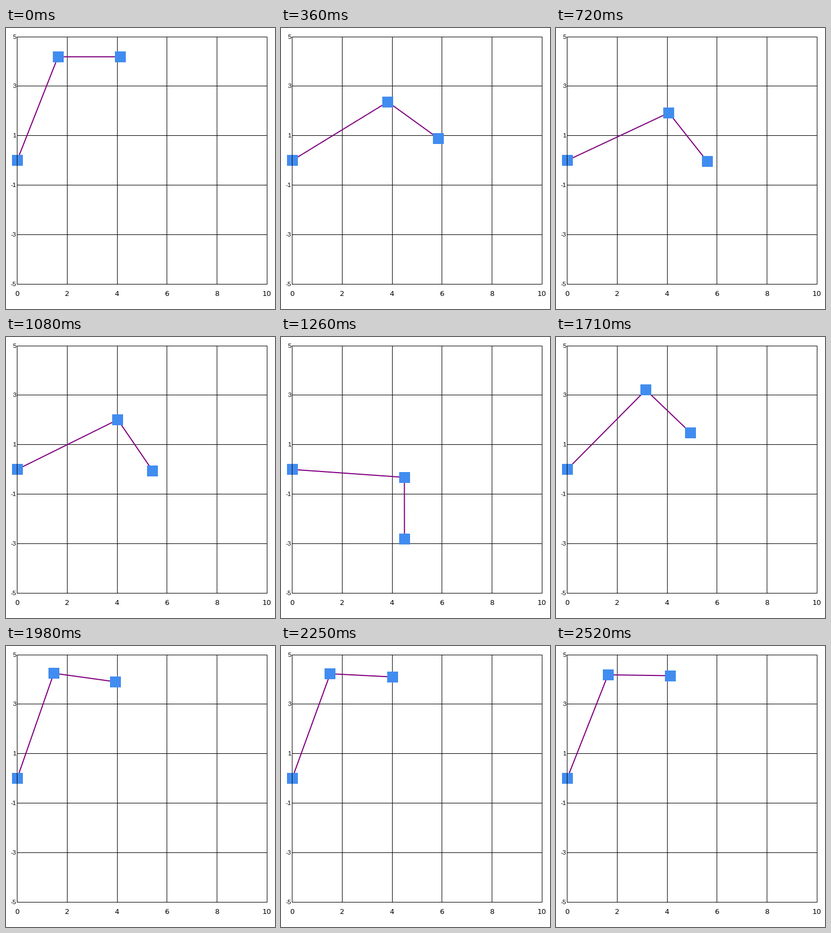
These frames come from a looping animation (494 px wide and 516 px high, 2.61 s). A matplotlib script:

```python
import numpy as np
import matplotlib.pyplot as plt
from matplotlib.animation import FuncAnimation
from matplotlib.patches import Rectangle

W, H, DPI = 494, 516, 100
FRAMES, INTERVAL = 29, 90
X0, Y0 = 20.5, 243.2          # pixel position of the base joint
SX, SY = 45.9, 45.4           # pixels per unit
UPPER, FORE = 4.5, 2.5        # link lengths
DAMP, FREQ = 0.477, 0.447     # shoulder response per frame
ELBOW_KEEP = 0.863            # share of elbow error left after one frame
SIZE = 20

# first frame, head start, shoulder from/to, elbow goal, slow and fast elbow error, fast rate
MOVES = [
    (0, 0.0, 68.7, 26.6, -89.0, 38.0, -17.7, 3.0),
    (13, 2.15, 26.6, -15.45, -110.5, 28.6, 0.0, 1.0),
    (18, 2.15, -16.6, 68.65, -63.0, -28.6, -5.4, 1.0),
]


def joint_angles(i):
    """Underdamped shoulder step, slow elbow with a short reaction kick."""
    move = [m for m in MOVES if m[0] <= i][-1]
    first, lead, start, goal, elbow_goal, slow, fast, rate = move
    t = i - first
    phase = FREQ * (t + lead)
    left = np.exp(-DAMP * (t + lead)) * (np.cos(phase) + DAMP / FREQ * np.sin(phase))
    shoulder = goal + (start - goal) * left
    elbow = elbow_goal + slow * ELBOW_KEEP ** t + fast * np.exp(-rate * t)
    return np.radians(shoulder), np.radians(elbow)


def arm_points(i):
    a, b = joint_angles(i)
    x = np.array([0, UPPER * np.cos(a), UPPER * np.cos(a) + FORE * np.cos(a + b)])
    y = np.array([0, UPPER * np.sin(a), UPPER * np.sin(a) + FORE * np.sin(a + b)])
    return X0 + SX * x, Y0 - SY * y


def px(n):
    return n * 72 / DPI


fig = plt.figure(figsize=(W / DPI, H / DPI), dpi=DPI, facecolor="white")
ax = fig.add_axes([0, 0, 1, 1])
ax.set_xlim(0, W)
ax.set_ylim(H, 0)
ax.axis("off")


def bar(x, y, w, h, z=1):
    ax.add_patch(Rectangle((x, y), w, h, fc="black", lw=0, antialiased=False, zorder=z))


for k in range(6):
    col, row = int(X0 + 91.8 * k), int(16 + 90.8 * k)
    bar(col, 16, 1, 455, 4 if k == 0 else 1)
    bar(20, row, 460, 1)
    ax.text(col - 0.2, 486.5, str(2 * k), family="DejaVu Sans", size=px(13),
            ha="center", va="center_baseline")
    ax.text(18.5, row + 0.2, str(5 - 2 * k), family="Liberation Sans", size=px(11.5),
            ha="right", va="center_baseline")

arm, = ax.plot([], [], color="#800080", lw=px(2), zorder=2)
joints = [ax.add_patch(Rectangle((0, 0), SIZE, SIZE, fc="#418CF0", lw=0, zorder=3))
          for _ in range(3)]


def draw(i):
    xs, ys = arm_points(i)
    arm.set_data(xs, ys)
    for joint, x, y in zip(joints, xs, ys):
        joint.set_xy((x - SIZE / 2, y - SIZE / 2))
    return [arm, *joints]


anim = FuncAnimation(fig, draw, frames=FRAMES, interval=INTERVAL, repeat=True,
                     repeat_delay=0, blit=False)
plt.show()
```
